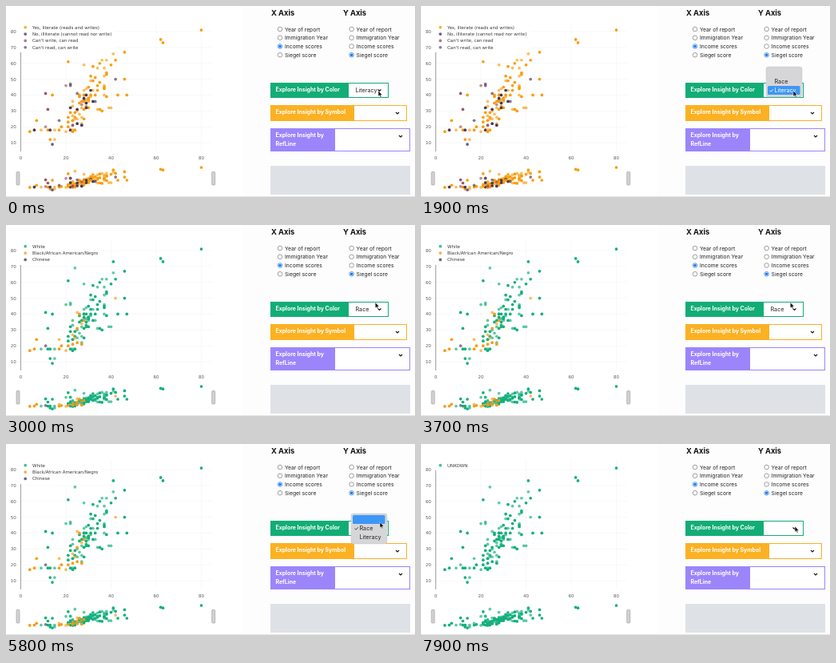
Animation, 512 px wide and 239 px high, one loop 8000 ms. Source, as an HTML page:

```html
<!DOCTYPE html>
<html lang="en">
<head>
<meta charset="utf-8">
<title>Scatter explorer</title>
<style>
html, body { margin: 0; width: 100%; height: 100%; overflow: hidden; background: #fff; }
svg { display: block; width: 100%; height: 100%; }
text { white-space: pre; }
.plot { font: 5.5px "DejaVu Sans", sans-serif; fill: #3a3a3a; }
.tick { font: 5.5px "DejaVu Sans", sans-serif; fill: #5c5c5c; }
.ui { font: 6.75px Inter, sans-serif; fill: #222; }
.head { font: 700 9.3px Inter, sans-serif; fill: #111; }
.btn { font: 700 6.93px Inter, sans-serif; fill: #fff; }
.pick { font: 7.2px Inter, sans-serif; fill: #222; }
</style>
</head>
<body>
<svg id="stage" viewBox="0 0 512 239" preserveAspectRatio="none"></svg>
<script>
const LOOP = 8000;
const stage = document.getElementById('stage');

function add(parent, tag, attrs, text) {
  const el = document.createElementNS('http://www.w3.org/2000/svg', tag);
  for (const k in attrs) el.setAttribute(k, attrs[k]);
  if (text !== undefined) el.textContent = text;
  parent.appendChild(el);
  return el;
}
const rect = (p, x, y, width, height, fill, more) =>
  add(p, 'rect', { x, y, width, height, fill, ...more });
const label = (p, cls, x, y, text, more) =>
  add(p, 'text', { class: cls, x, y, ...more }, text);
const dot = (p, cx, cy, r, fill, more) => add(p, 'circle', { cx, cy, r, fill, ...more });
const chevron = (p, x, y) => add(p, 'path', {
  d: `M${x - 2} ${y - 1}l2 2l2 -2`, fill: 'none', stroke: '#111', 'stroke-width': 1.1
});

// Chart scales
const px = v => 18.5 + 2.825 * v;
const py = v => 190.9 - 1.986 * v;
const pyMini = v => 233.6 - 0.39 * v;

// Known points as income, score pairs, by race and literacy
const groups = [
  { race: 0, lit: 0, at: [80,81, 62,75, 63,73, 41,73, 24,69, 21,61, 28,59, 41,66, 42,62, 46,67,
    36,62, 35,60, 40,59, 37,57, 46,50, 43,40, 47,40, 14,40, 13,12, 15,12, 9,18, 12,18, 15,18,
    24,18, 23,17, 35,31, 36,30, 39,32, 40,32, 32,58, 38,53, 37,40] },
  { race: 0, lit: 1, at: [22,47, 22,46, 13,18, 22,32, 29,40, 28,37, 33,36, 29,32] },
  { race: 0, lit: 2, at: [11,41, 12,31, 20,46] },
  { race: 0, lit: 3, at: [14,9] },
  { race: 1, lit: 0, at: [4,17, 7,24, 17,18, 18,20, 20,17, 21,20, 23,27, 24,25, 26,40, 28,36] },
  { race: 1, lit: 1, at: [6,18, 17,24, 25,31, 25,41, 42,50, 25,22, 27,21] },
  { race: 1, lit: 2, at: [23,21, 27,34] },
  { race: 2, lit: 2, at: [11,20] }
];

let seed = 41;
const rnd = () => (seed = (seed * 16807) % 2147483647) / 2147483647;

function makePoints() {
  const list = [];
  // Dense middle of the cloud
  for (let i = 0; i < 60; i++) {
    const x = Math.round(19 + 21 * (rnd() + rnd()) / 2);
    const spread = (rnd() + rnd() - 1) * 14;
    const y = Math.round(Math.max(18, 34 + (x - 28) * 1.7 + spread));
    list.push({ x, y, race: 0, lit: i % 12 === 5 ? 1 : 0 });
  }
  for (const { race, lit, at } of groups)
    for (let i = 0; i < at.length; i += 2) list.push({ x: at[i], y: at[i + 1], race, lit });
  return list;
}

const modes = {
  literacy: {
    key: 'lit', box: [118, 39],
    colors: ['#f99d0c', '#4b3659', '#9d5868', '#5f5a91'],
    names: ['Yes, literate (reads and writes)', 'No, illiterate (cannot read nor write)',
      "Can't write, can read", "Can't read, can write"]
  },
  race: {
    key: 'race', box: [101, 31],
    colors: ['#13af7c', '#f59c16', '#553b62'],
    names: ['White', 'Black/African American/Negro', 'Chinese']
  },
  none: { key: null, box: [44, 14], colors: ['#13af7c'], names: ['UNKOWN'] }
};

// Chart
rect(stage, 0, 0, 512, 239, '#fff');
rect(stage, 296, 0, 216, 239, '#fdfdfe');
for (let v = 10; v <= 80; v += 10) {
  rect(stage, 18, py(v) - 0.25, 240, 0.5, '#eef0f2');
  label(stage, 'tick', 12.8, py(v) + 2, v, { 'text-anchor': 'end' });
}
for (let v = 0; v <= 80; v += 20) {
  if (v) rect(stage, px(v) - 0.25, 20, 0.5, 162, '#f1f1f2');
  label(stage, 'tick', px(v), 191.5, v, { 'text-anchor': 'middle' });
}
rect(stage, 18, 22, 0.8, 160, '#8a8a8a');
const points = makePoints().map(p => {
  const opacity = rnd() < 0.4 ? 0.68 : 1;
  p.dots = [py, pyMini].map(f => dot(stage, px(p.x), f(p.y), 1.85, '#000', { opacity }));
  return p;
});
for (const x of [13, 257.7])
  rect(stage, x, 207.5, 4, 16.5, '#d2d2d2', { rx: 1, stroke: '#999', 'stroke-width': 0.6 });
rect(stage, 0, 238, 512, 1, '#e4e4e4');

for (const mode of Object.values(modes)) {
  const g = mode.legend = add(stage, 'g');
  rect(g, 17.5, 19, mode.box[0] + 1.5, mode.box[1], '#fff');
  mode.names.forEach((name, i) => {
    const y = 26.7 + i * 8.35;
    dot(g, 24.2, y, 1.85, mode.colors[i], { opacity: 0.8 });
    label(g, 'plot', 33, y + 2, name);
  });
}

// Axis choices
const fields = ['Year of report', 'Immigration Year', 'Income scores', 'Siegel score'];
[['X Axis', 332, 343, 2], ['Y Axis', 422, 432.6, 3]].forEach(([title, tx, x, on]) => {
  label(stage, 'head', tx, 11.5, title);
  fields.forEach((name, i) => {
    const y = 29 + i * 10.75;
    const picked = i === on;
    dot(stage, x, y, 2.8, '#fff', { stroke: picked ? '#1674ea' : '#777', 'stroke-width': 0.7 });
    if (picked) dot(stage, x, y, 1.75, '#1674ea');
    label(stage, 'ui', x + 6, y + 2.5, name);
  });
});

// Insight controls
function control(y, h, split, end, color, lines) {
  rect(stage, 331.5, y + 0.5, end - 332, h - 1, '#fff', { stroke: color });
  rect(stage, 331, y, split - 331, h, color);
  lines.forEach((s, i) => label(stage, 'btn', 337.5, y + 11.4 + i * 10.6, s));
}
control(96, 19, 429, 479, '#12ad76', ['Explore Insight by Color']);
control(124, 20, 436, 502, '#fbb122', ['Explore Insight by Symbol']);
control(153, 29, 412, 506, '#9c85fb', ['Explore Insight by', 'RefLine']);
chevron(stage, 467.5, 105.5);
chevron(stage, 490, 134);
chevron(stage, 494, 163);
rect(stage, 331, 200, 175, 36, '#dee2e6');
const choice = label(stage, 'pick', 437.5, 108.2, '');

// Popup menu; the current item sits over the closed control
const ROW = 11;
const options = ['', 'Race', 'Literacy'];
const menu = add(stage, 'g');
rect(menu, 432, -7.5, 45, 38, '#d6d6d9', { rx: 3, stroke: '#bbb', 'stroke-width': 0.4 });
const hover = rect(menu, 434, 0, 40.5, ROW, '#3d97f7', { rx: 1.5 });
const items = options.map((s, i) => label(menu, 'pick', 442.5, i * ROW + 2.6, s));
const tick = label(menu, 'pick', 435.5, 0, '✓');

const cursor = add(stage, 'path', {
  d: 'M0 0V7.2L1.7 5.7L2.8 8.2L4 7.7L2.9 5.2H5.1Z',
  fill: '#111', stroke: '#fff', 'stroke-width': 0.5
});

// Pointer stops: time, x, y
const stops = [
  [0, 466, 106], [1950, 466, 106], [2350, 462.2, 96.8], [4200, 462.2, 96.8],
  [4900, 469.5, 102], [5500, 469.5, 102], [6000, 467.2, 95.5], [6900, 467.2, 95.5],
  [7500, 468, 103], [LOOP, 468, 103]
];
function pointer(t) {
  const i = stops.findIndex(s => s[0] > t);
  const [t0, x0, y0] = stops[i - 1], [t1, x1, y1] = stops[i];
  const u = (t - t0) / (t1 - t0), e = u * u * (3 - 2 * u);
  return [x0 + (x1 - x0) * e, y0 + (y1 - y0) * e];
}

let shown;
function showMode(mode) {
  if (mode === shown) return;
  shown = mode;
  for (const p of points)
    for (const c of p.dots) c.setAttribute('fill', mode.colors[mode.key ? p[mode.key] : 0]);
  for (const m of Object.values(modes))
    m.legend.setAttribute('visibility', m === mode ? 'visible' : 'hidden');
}

function showMenu(t, y) {
  const first = t < 4000;
  const [open, close] = first ? [1800, 2520] : [5200, 6100];
  const fade = t < open ? 0 : Math.max(0, Math.min(1, 1 - (t - close) / 250));
  menu.setAttribute('opacity', fade);
  const current = first ? 2 : 1;
  const top = 105.5 - current * ROW;
  const over = Math.max(0, Math.min(2, Math.round((y - top) / ROW)));
  menu.setAttribute('transform', `translate(0 ${top})`);
  hover.setAttribute('y', (over - 0.5) * ROW);
  items.forEach((el, i) => el.style.fill = i === over ? '#fff' : '#222');
  tick.setAttribute('y', current * ROW + 2.6);
  tick.style.fill = over === current ? '#fff' : '#222';
}

function render(t) {
  const [x, y] = pointer(t);
  showMode(t < 2900 ? modes.literacy : t < 6650 ? modes.race : modes.none);
  choice.textContent = t < 2750 ? 'Literacy' : t < 6500 ? 'Race' : '';
  showMenu(t, y);
  cursor.setAttribute('transform', `translate(${x} ${y})`);
}

const start = performance.now();
function loop() {
  render((performance.now() - start) % LOOP);
  requestAnimationFrame(loop);
}
loop();
</script>
</body>
</html>
```
